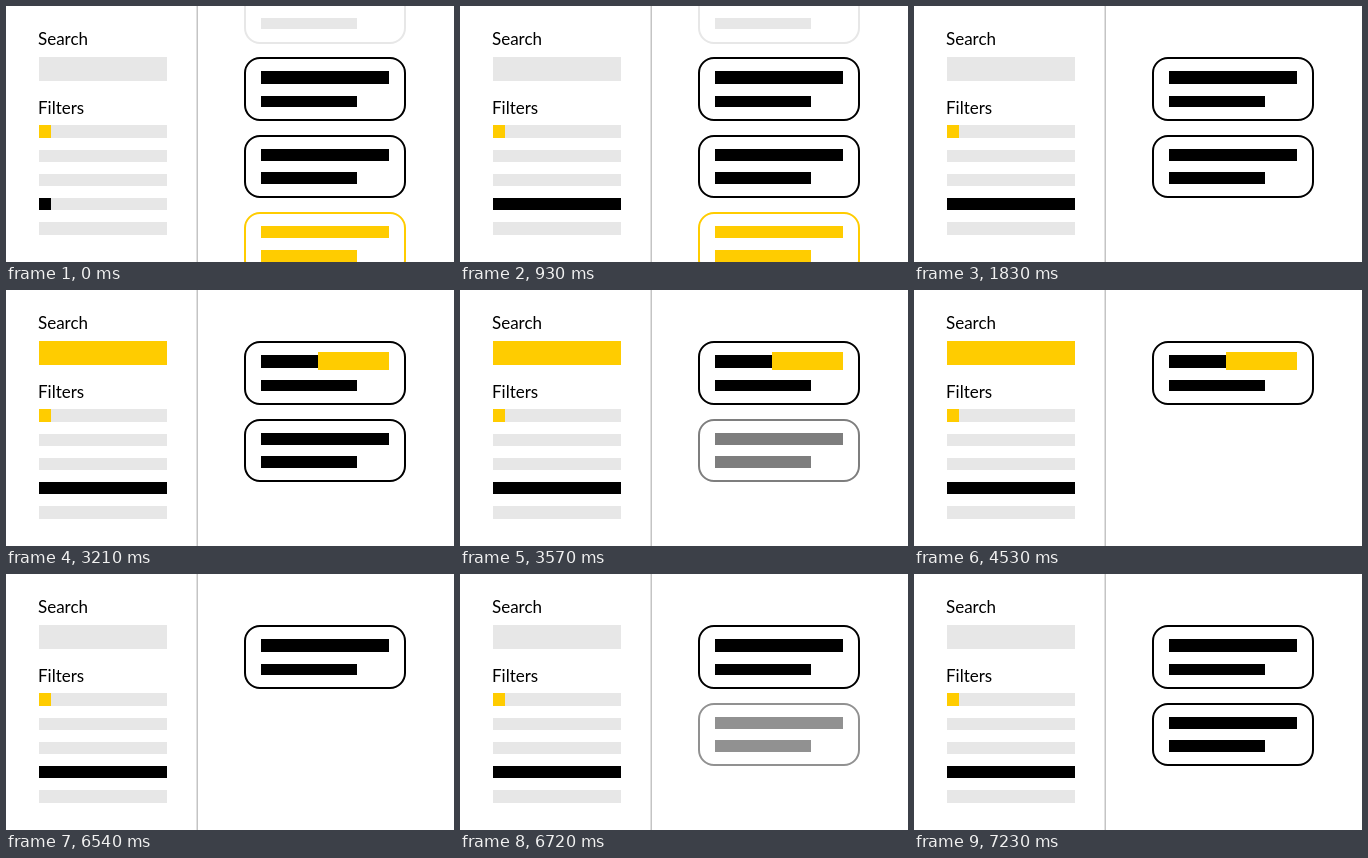
Recreate the animation shown at these times as an HTML page. Size 448 by 256 pixels, loop 8000 ms.

```html
<!DOCTYPE html>
<html lang="en">
<head>
<meta charset="utf-8">
<title>Search and filters</title>
<style>
  html, body { margin: 0; width: 100%; height: 100%; overflow: hidden; background: #fff; }
  svg { display: block; width: 448px; height: 256px; }
  text { font: 17px Lato, sans-serif; }
  .bar { shape-rendering: crispEdges; }
</style>
</head>
<body>
<svg id="stage" viewBox="0 0 448 256"></svg>
<script>
const LOOP = 8000, STEP = 30;
const GREY = '#e7e7e7', YELLOW = '#ffcc00', BLACK = '#000';
const stage = document.getElementById('stage');

function add(parent, tag, attrs) {
  const el = document.createElementNS('http://www.w3.org/2000/svg', tag);
  for (const key in attrs) el.setAttribute(key, attrs[key]);
  return parent.appendChild(el);
}

function bar(parent, x, y, width, height, fill) {
  return add(parent, 'rect', { class: 'bar', x, y, width, height, fill });
}

function label(y, text) {
  add(stage, 'text', { x: 32, y }).textContent = text;
}

// An outlined card holding a long and a short bar, each given as [y, height].
function card(y, height, long, short, color) {
  const g = add(stage, 'g', {});
  add(g, 'rect', { x: 239, y, width: 160, height, rx: 15, fill: 'none', stroke: color, 'stroke-width': 2 });
  bar(g, 255, long[0], 128, long[1], color);
  bar(g, 255, short[0], 96, short[1], color);
  return g;
}

// Sidebar
label(39, 'Search');
const search = bar(stage, 33, 51, 128, 24, GREY);
label(108, 'Filters');
[[119, 13], [144, 12], [168, 12], [192, 12], [216, 13]].forEach(([y, h]) => bar(stage, 33, y, 128, h, GREY));
bar(stage, 33, 119, 12, 13, YELLOW);
bar(stage, 33, 192, 12, 12, BLACK);
const chosen = bar(stage, 33, 192, 128, 12, BLACK);
add(stage, 'rect', { x: 190.5, y: 0, width: 1.5, height: 256, fill: '#c4c4c4' });

// Results
const others = [
  card(-25, 62, [-12, 12], [12, 11], GREY),
  card(207, 62, [220, 12], [244, 12], YELLOW)
];
card(52, 62, [65, 13], [90, 11], BLACK);
const second = card(130, 61, [143, 12], [166, 12], BLACK);
const match = bar(stage, 312, 62, 71, 18, YELLOW);

function ramp(t, start, length) {
  return Math.min(1, Math.max(0, (t - start) / length));
}

function draw(now) {
  const t = Math.floor(now % LOOP / STEP) * STEP;
  const searching = t >= 3210 && t < 6540;
  search.setAttribute('fill', searching ? YELLOW : GREY);
  match.setAttribute('opacity', searching ? 1 : 0);
  chosen.setAttribute('opacity', ramp(t, 30, 150));
  others.forEach(g => g.setAttribute('opacity', 1 - ramp(t, 1590, 240)));
  second.setAttribute('opacity', 1 - ramp(t, 3360, 420) + ramp(t, 6540, 420));
}

const start = performance.now();
function tick() {
  draw(performance.now() - start);
  requestAnimationFrame(tick);
}
tick();
</script>
</body>
</html>
```
